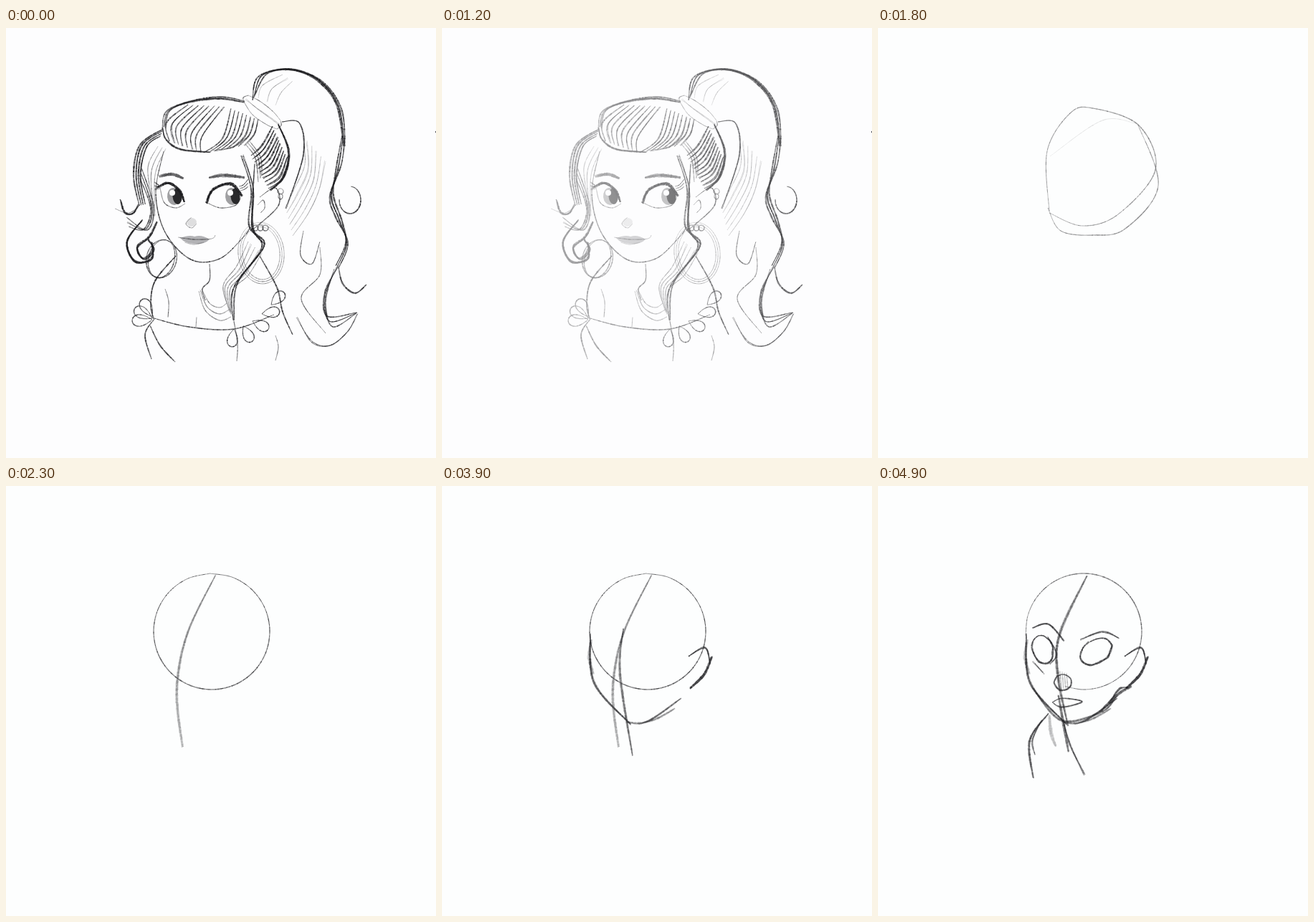
Recreate the animation shown at these times as an HTML page with a canvas. Size 600x600 px, loop 5 s.

```html
<!DOCTYPE html>
<html lang="en">
<head>
<meta charset="utf-8">
<title>Pencil portrait</title>
<style>
html, body { margin: 0; width: 100%; height: 100%; overflow: hidden; background: #fdfdfe; }
canvas { display: block; width: 600px; height: 600px; }
</style>
</head>
<body>
<canvas id="stage" width="600" height="600"></canvas>
<script>
const ctx = document.getElementById('stage').getContext('2d');
const LOOP = 5000, STEP = 100, END = LOOP / STEP;
const FADE = 12, BLANK = 13, SKETCH = 18;
let seed = 1;
const rnd = () => (seed = (seed * 16807) % 2147483647) / 2147483647;
const mix = (a, b, t) => a + (b - a) * t;

// 'x y x y ...' to a list of points; lists pass through
function points(shape) {
  if (typeof shape !== 'string') return shape;
  const n = shape.split(' ').map(Number);
  return Array.from({ length: n.length / 2 }, (_, i) => [n[2 * i], n[2 * i + 1]]);
}

function arc(cx, cy, rx, ry, tilt = 0, from = -1.6, to = from + 2 * Math.PI) {
  return Array.from({ length: 17 }, (_, i) => {
    const a = mix(from, to, i / 16), x = rx * Math.cos(a), y = ry * Math.sin(a);
    return [cx + x * Math.cos(tilt) - y * Math.sin(tilt), cy + x * Math.sin(tilt) + y * Math.cos(tilt)];
  });
}

// Leaf-shaped loop that leaves and returns to one point
function petal(x, y, angle, length) {
  return Array.from({ length: 9 }, (_, i) => {
    const a = i * Math.PI / 8, r = length * Math.sin(a), dir = angle + Math.cos(a) * 0.6;
    return [x + r * Math.cos(dir), y + r * Math.sin(dir)];
  });
}

// Catmull-Rom spline sampled about every 2px
function spline(pts) {
  const out = [pts[0]];
  for (let i = 0; i < pts.length - 1; i++) {
    const a = pts[i - 1] || pts[i], b = pts[i], c = pts[i + 1], d = pts[i + 2] || c;
    const n = Math.max(2, Math.ceil(Math.hypot(c[0] - b[0], c[1] - b[1]) / 2));
    for (let j = 1; j <= n; j++) {
      const t = j / n;
      out.push([0, 1].map(k => 0.5 * (2 * b[k] + (c[k] - a[k]) * t +
        (2 * a[k] - 5 * b[k] + 4 * c[k] - d[k]) * t * t +
        (3 * b[k] - a[k] - 3 * c[k] + d[k]) * t * t * t)));
    }
  }
  return out;
}

// One grainy pencil line, tapered at both ends
function pencil(width, dark, shape, passes = 1, part = 1) {
  const base = points(shape);
  seed = Math.round(base[0][0] * 131 + base[0][1] * 17 + base.length * 7 + 11);
  for (let p = 0; p < passes; p++) {
    const wob = p ? 3 : 0;
    const line = spline(base.map(([x, y]) => [x + (rnd() - 0.5) * wob, y + (rnd() - 0.5) * wob]));
    const end = Math.round((line.length - 1) * part);
    for (let i = 0; i < end; i++) {
      const u = i / (line.length - 1);
      ctx.globalAlpha = Math.min(1, dark * (0.65 + 0.5 * rnd()));
      ctx.lineWidth = width * (0.55 + 0.45 * Math.sin(Math.PI * u)) * (0.8 + 0.4 * rnd());
      ctx.beginPath();
      ctx.moveTo(...line[i]);
      ctx.lineTo(...line[i + 1]);
      ctx.stroke();
    }
  }
  ctx.globalAlpha = 1;
}

// Bundle of hair spread evenly between two guide curves
function strands(count, width, dark, first, last) {
  const a = points(first), b = points(last);
  for (let i = 0; i < count; i++) {
    const t = i / (count - 1);
    const hair = a.map((p, k) => [mix(p[0], b[k][0], t), mix(p[1], b[k][1], t)]);
    pencil(width * (i % 2 ? 0.65 : 1), dark, hair, 1 + i % 2);
  }
}

function blob(color, cx, cy, rx, ry, tilt = 0) {
  ctx.fillStyle = color;
  ctx.beginPath();
  ctx.ellipse(cx, cy, rx, ry, tilt, 0, 7);
  ctx.fill();
}

function ponytail() {
  strands(3, 2.4, .85, '344 101 352 68 395 58 440 74 468 113 473 165', '347 94 364 64 398 58 434 73 461 107 471 165');
  strands(3, 2.2, .85, '473 150 468 190 452 235 460 264 477 300 464 335', '469 150 460 200 457 234 469 270 474 300 460 332');
  pencil(2.2, .9, '464 334 470 357 487 370 503 358');
  pencil(1.7, .9, arc(480, 240, 15, 19, 0, -1.5, 3.2));
  strands(3, 1.7, .8, '464 332 445 368 448 402 489 397', '458 336 446 382 456 417 490 397');
  pencil(1.2, .7, '405 404 427 437 452 443 476 424 490 399', 2);
  pencil(1.3, .75, '415 283 411 317 427 329 438 298');
  pencil(1.2, .7, '438 306 438 344 412 378 446 426');
  pencil(1.4, .75, '385 131 410 133 415 178 390 252', 2);
  strands(6, .9, .45, '414 150 417 190 402 225 390 250', '446 186 437 225 422 258 400 290');
  strands(3, .9, .4, '352 98 358 80 386 65', '376 108 384 90 400 74');
  strands(3, 1, .6, '332 103 344 121 364 135 378 141', '338 94 354 102 372 116 383 129');
  pencil(1.2, .7, '332 103 331 97 338 94');
  pencil(1.2, .7, '383 129 384 136 378 141');
}

function crown() {
  strands(3, 1.9, .8, '218 141 224 116 258 102 300 96 333 102', '222 136 230 114 260 103 298 99 333 104');
  pencil(2, .8, '218 139 224 156 244 169 284 173', 2);
  pencil(1.2, .6, '290 172 318 166 338 152', 2);
  strands(8, 1.9, .75, '228 158 224 132 254 107', '272 174 274 150 305 110');
  strands(8, 1.9, .75, '276 174 302 154 314 112', '332 164 346 148 352 128');
  strands(11, 2.4, .85, '342 178 357 164 372 137', '366 224 384 212 394 186');
  pencil(2.4, .9, '380 135 395 172 388 208 368 226', 2);
  strands(3, 1.4, .6, '334 162 348 182 352 215', '340 158 355 180 357 205');
}

function sideHair() {
  strands(4, 2.2, .85, '219 141 187 163 178 205 186 248', '216 150 196 166 188 205 194 246');
  pencil(2, .85, '186 246 177 259 166 257 160 240', 2);
  pencil(1, .55, '152 252 172 258 190 244');
  strands(3, 1.8, .75, '189 195 206 250 197 282 168 264', '187 210 202 252 192 281 171 277');
  strands(3, 1, .5, '223 168 208 205 208 262', '212 165 198 195 204 240');
  pencil(2.3, .8, '190 268 169 298 180 326 204 322 203 298', 3);
  pencil(2.1, .8, '211 270 200 292 183 306 192 322 206 309 198 295', 3);
  [18, 21].forEach(r => pencil(1.5, .75, arc(217, 322, r, 27, .25)));
  [26, 29, 32].forEach(r => pencil(.9, .5, arc(356, 314, r, r + 11, -.1)));
  strands(2, 2.2, .85, '328 178 342 225 339 275 357 306 318 362 317 408', '330 178 345 225 343 280 360 304 322 358 318 408');
  pencil(1.3, .65, '317 404 323 440 322 465');
  pencil(1.6, .7, '347 190 344 250 347 285 362 302', 2);
  strands(5, 1.1, .55, '338 298 322 332 303 360 312 394', '357 314 338 345 316 366 314 400');
  strands(3, 1.2, .55, '269 367 278 394 298 408 314 403', '273 364 284 384 298 390 308 384');
}

function eye(cx, cy, irisX, lash, lower) {
  blob('#a0a0a2', irisX - 5, cy + 2, 9, 12, -.1);
  blob('#29292b', irisX, cy + 2, 6.5, 11, -.1);
  blob('#fdfdfe', irisX - 7, cy - 3, 4, 4);
  pencil(3.2, .95, lash, 2);
  pencil(1.1, .75, lower);
}

function face() {
  pencil(1.5, .85, '220 172 209 230 222 285 258 323 298 322 331 292 341 278');
  pencil(4.2, .5, '214 208 231 204 248 210', 2);
  pencil(4.2, .5, '283 209 304 205 333 209', 2);
  eye(232, 233, 239, '211 222 226 216 242 226 249 243', '215 223 221 244 237 251 250 245');
  eye(306, 233, 320, '279 244 289 225 313 218 329 235', '279 243 299 251 321 247 328 235');
  for (let i = 0; i < 3; i++) {
    pencil(1.2, .8, [[217 - i, 222 + i], [207, 215 + 5 * i]]);
    pencil(1.2, .8, [[325 + i, 221 + 3 * i], [331 + i, 219 + 3 * i], [338, 211 + 5 * i]]);
  }
  blob('#dededf', 259, 271, 7, 6);
  pencil(1.1, .45, '259 264 251 273 259 279 266 273');
  ctx.fillStyle = '#b2b2b5';
  ctx.fill(new Path2D('M243 293Q256 288 263 291Q273 288 284 295Q276 303 262 301Q250 301 243 293Z'));
  pencil(1.2, .6, '240 292 262 295 287 294 292 289');
  pencil(.9, .5, '249 299 262 302 276 299');
  pencil(1.4, .8, '354 236 376 223 380 248 346 280');
  pencil(1.1, .75, '351 247 359 240 361 251 355 258');
  for (let i = 0; i < 2; i++) pencil(1.1, .75, arc(383, 228 + 7 * i, 4 - i, 4));
  for (let i = 0; i < 3; i++) pencil(1.3, .75, arc(348 + 7 * i, 279, 4, 4));
}

function body() {
  pencil(1.5, .8, '284 329 284 352 274 364 278 380');
  pencil(2, .9, '237 318 208 353 202 385 206 406');
  pencil(1.2, .65, '222 364 227 382 226 404');
  pencil(1.1, .55, '266 403 265 417');
  pencil(1.5, .85, '203 404 255 417 318 420 374 400');
  for (let i = 0; i < 3; i++) pencil(1.4, .8, petal(204, 403 + 2 * i, -2.1 - .55 * i, 28));
  for (let i = 0; i < 5; i++) pencil(1.4, .85, petal(318 + 13 * i, 420 - 1.4 * i * (i + 2), 1.7 - .62 * i, 25));
  pencil(1.9, .85, '354 318 378 362 386 396 400 428');
  pencil(1.9, .85, '207 406 194 428 203 462');
  pencil(1.8, .85, '201 415 215 443 236 466');
  pencil(1.1, .6, '376 429 380 445 376 464');
}

function portrait() {
  ponytail();
  crown();
  sideHair();
  face();
  body();
  blob('#55555a', 600, 145, 1.2, 1.2);
}

const GUIDE = '292 125 253 207 239 285 247 364';
const GUIDE_2 = '253 199 249 262 266 376';
const MIDLINE = '292 125 254 207 250 262 265 335';
const JAW_LEFT = '207 206 212 275 263 332';
const JAW_RIGHT = '258 330 286 329 334 296';

function construction(step) {
  // Draws a line that grows over some steps and is rubbed out at another
  const line = (from, width, dark, shape, { span = 1, until = END, passes = 2 } = {}) => {
    if (step >= from && step < until) pencil(width, dark, shape, passes, Math.min(1, (step - from + 1) / span));
  };
  const mouth = (from, x, until) => line(from, 1.7, .55, [[x, 302], [x + 14, 296], [x + 42, 301], [x + 14, 309], [x, 302]], { until });

  // skull: loose loop, clean circle, then the part outside the face
  const loose = { until: 19, passes: 1 };
  line(18, 1.3, .5, '239 256 236 172 268 119 300 112 364 136 387 198 335 260 285 276 239 258', loose);
  line(18, 1.3, .5, '237 251 255 283 300 289 345 280 391 220 362 133', loose);
  line(18, .9, .14, '362 134 313 129 240 179', loose);
  line(19, 1.4, .75, arc(287, 203, 81, 81), { until: 44, passes: 1 });
  line(44, 1.4, .65, arc(287, 203, 81, 81, 0, -3.2, 1.9), { passes: 1 });

  // guides and jaw
  line(20, 2.6, .32, GUIDE, { span: 4, until: 44 });
  line(24, 2.6, .45, GUIDE_2, { span: 3, until: 44 });
  line(27, 2.6, .55, JAW_LEFT, { span: 3 });
  line(28, 4, .2, '208 214 206 238 211 262');
  line(30, 2.4, .45, JAW_RIGHT, { span: 3 });
  line(33, 2.2, .35, '274 332 300 324 325 310');
  line(35, 2, .65, '344 238 367 225 374 249', { span: 3 });
  line(38, 3.4, .7, '376 238 366 262 346 283', { span: 2 });
  line(40, 2.2, .6, '348 281 336 283 323 304');

  // features
  line(41, 2.1, .65, arc(230, 228, 14, 20, -.3));
  line(41, 1.8, .5, '237 211 249 234 240 249');
  line(42, 2.2, .65, arc(304, 231, 24, 16, -.55));
  line(42, 2.6, .45, GUIDE_2 + ' 271 382', { until: 44 });
  line(42, 3, .45, MIDLINE);
  line(43, 2.1, .55, arc(245, 275, 12, 11), { until: 44 });
  mouth(43, 238, 44);
  line(43, 3, .4, '216 282 256 327 312 315 333 294');
  line(44, 4.5, .16, '239 320 242 345 248 363');
  line(44, 3.4, .4, '252 292 266 371');
  line(44, 2, .55, arc(258, 274, 12, 11));
  mouth(44, 243);
  for (let i = 0; i < 5; i++) line(45, 1.6, .3, [[251 + 3 * i, 257 + i], [253 + 3 * i, 286 - i]], { passes: 1 });
  line(45, 2, .55, '259 330 268 362 289 403', { span: 2 });
  line(46, 3.6, .5, '309 315 336 290 354 280');

  // brows and shoulder
  line(47, 2.2, .6, '215 198 238 193 260 216');
  line(47, 1.4, .5, '216 244 232 263');
  line(48, 2, .55, '282 214 313 204 336 212');
  line(48, 2.6, .55, '238 317 212 355 217 408', { span: 2 });
  line(49, 1.8, .5, '229 326 215 355 219 375');
}

function fade() {
  const g = ctx.createLinearGradient(170, 0, 500, 0);
  g.addColorStop(0, 'rgba(253,253,254,.58)');
  g.addColorStop(1, 'rgba(253,253,254,.15)');
  ctx.fillStyle = g;
  ctx.fillRect(0, 0, 598, 600);
}

function draw(step) {
  ctx.fillStyle = step < BLANK ? '#fdfdfe' : '#fdfefe';
  ctx.fillRect(0, 0, 600, 600);
  ctx.strokeStyle = '#1d1d20';
  if (step < BLANK) portrait();
  if (step === FADE) fade();
  if (step >= SKETCH) construction(step);
}

const start = performance.now();
let shown = -1;
function tick() {
  const step = Math.floor(((performance.now() - start) % LOOP) / STEP);
  if (step !== shown) draw(shown = step);
  requestAnimationFrame(tick);
}
tick();
</script>
</body>
</html>
```
